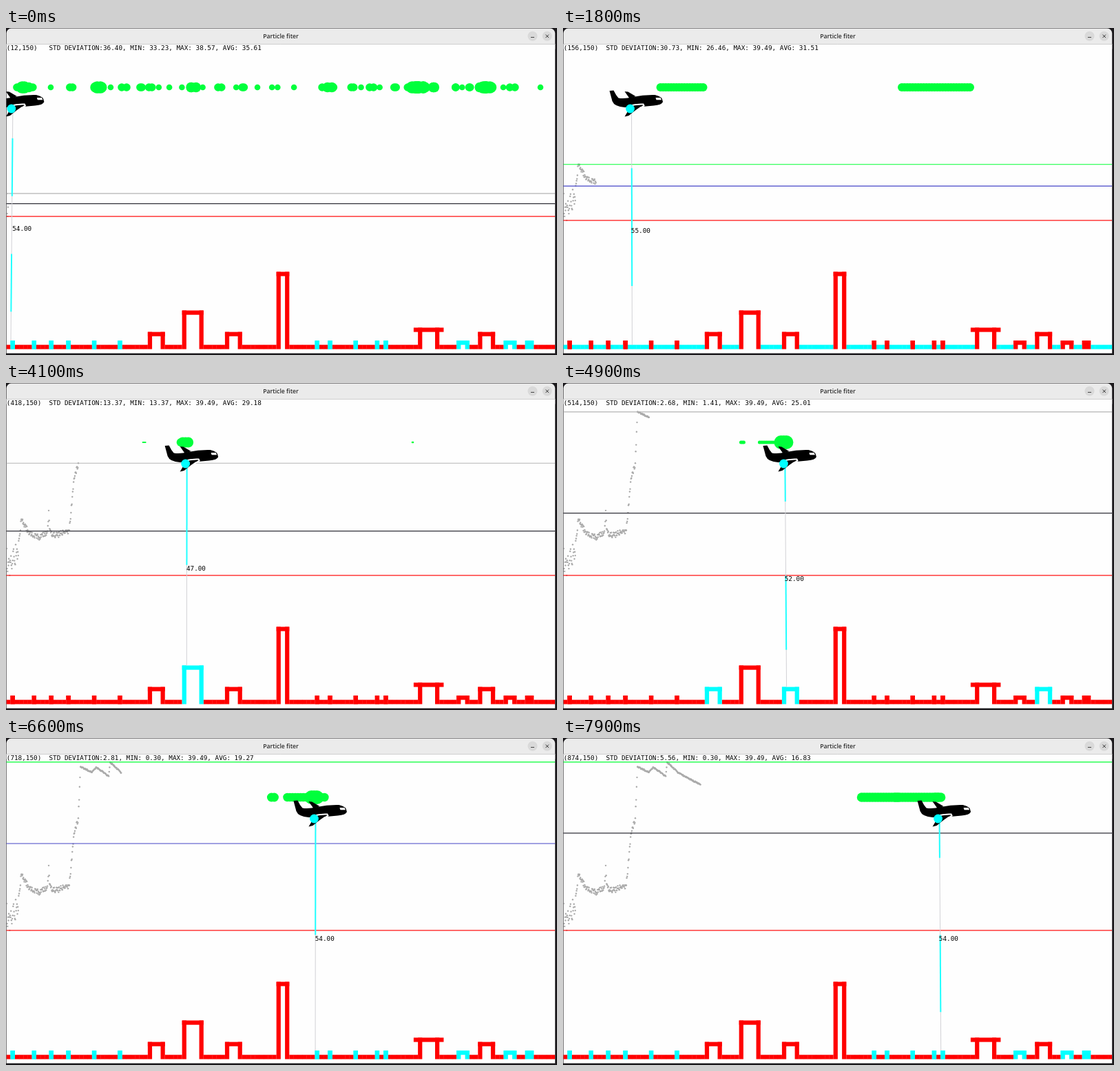
An HTML page with a canvas that plays this animation: 800 by 474 pixels, repeating every 8000 ms.

```html
<!DOCTYPE html>
<html lang="en">
<head>
<meta charset="utf-8">
<title>Particle fiter</title>
<style>
html, body { margin: 0; width: 100%; height: 100%; overflow: hidden; background: #1c1a1d; }
canvas { display: block; width: 800px; height: 474px; }
</style>
</head>
<body>
<canvas id="stage" width="800" height="474"></canvas>
<script>
const ctx = document.getElementById('stage').getContext('2d');
const S = 0.6226, CELL = 10 * S, X0 = 0.4, FLOOR = 465.5, COLS = 128;
const RIGHT = 797.2, BOTTOM = 471.5;
const RED = '#ff0000', CYAN = '#00ffff', GREEN = '#00ff3c';
const MONO = '9.32px "DejaVu Sans Mono", monospace';

// Buildings: first column, width, height in cells
const bumps = [1, 6, 10, 14, 20, 26, 72, 75, 81, 86, 88].map(c => [c, 1, 2]);
const builds = [...bumps, [33, 4, 4], [41, 5, 9], [51, 4, 4], [63, 3, 18],
  [95, 7, 5], [105, 3, 2], [110, 4, 4], [116, 3, 2], [121, 2, 2]];
const heights = Array(COLS).fill(1);
for (const [c, w, h] of builds) heights.fill(h, c, c + w);

// Key points: sample number, deviation
const curve = [[0, 33.23], [1, 37.92], [3, 36.4], [7, 39.49], [8, 36], [26, 34], [34, 26.46],
  [50, 29.3], [75, 30.73], [98, 29.39], [115, 30.15], [146, 29], [157, 17], [167, 13.37],
  [172, 1.41], [199, 2.68], [209, 1.5], [238, 3.6], [241, 0.3], [267, 2.81], [319, 5.56]];
// Key points: sample number, running average
const means = [[3, 35.61], [75, 31.51], [115, 30.81], [167, 29.18], [199, 25.01],
  [267, 19.27], [319, 16.83]];
// Swarm: step, trail from and to (from the plane), radii of trail, head and stray, far group start and radius
const swarm = [
  [18, 44, 106, 6, 0, 0, 492, 6],
  [28, -16, 38, 5.2, 8, 0, 508, 5],
  [41, -7, 1, 6, 7.5, 1, 590, 1.3],
  [49, -35, 0, 2.5, 10, 2.5, 592, 0],
  [66, -39, 15, 6.2, 10, 6.5, 592, 0],
  [79, -111, 0, 6.8, 6.8, 6.8, 592, 0]
];

const lerp = (a, b, f) => a + (b - a) * f;
const rnd = n => { const s = Math.sin(n * 127.1 + 3.7) * 43758.5453; return s - Math.floor(s); };

function span(keys, n) {
  let k = 0;
  while (k < keys.length - 2 && n >= keys[k + 1][0]) k++;
  const a = keys[k], b = keys[k + 1];
  return [a, b, Math.max(0, Math.min(1, (n - a[0]) / (b[0] - a[0])))];
}

function sample(n) {
  const [a, b, f] = span(curve, n);
  const dip = 5 * Math.exp(-Math.abs(n - 98) / 1.6);
  const noise = f % 1 === 0 ? 0 : (rnd(n) * 2 - 1) * (n < 28 ? 2.4 : n < 170 ? 0.7 : 0.15);
  const lo = Math.min(a[1], b[1]) - (n < 28 ? 2 : 0);
  return Math.min(39.4 + (f === 0), Math.max(lo, lerp(a[1], b[1], f) + noise) - dip);
}
const series = Array.from({ length: 320 }, (_, n) => sample(n));

function average(n) {
  const [a, b, f] = span(means, n);
  return lerp(a[0] * a[1], b[0] * b[1], f) / n;
}

// Crowded particles grow
const starts = Array.from({ length: 75 }, (_, k) => 12 + 775 * rnd(k + 40));
const scatter = starts.map(x =>
  [x, Math.min(9, 2.8 + 1.5 * starts.filter(o => Math.abs(o - x) < 8).length)]);

const travel = i => 12 + 8 * Math.min(i, 20) + 12 * Math.max(0, i - 20) - (i >= 35 ? 6 : 0);
const valueY = v => 33 + 10 * S * v;

function disc(x, y, r) {
  ctx.beginPath();
  ctx.arc(x, y, r, 0, 7);
  ctx.fill();
}

function line(x1, y1, x2, y2, color, w = 1) {
  ctx.strokeStyle = color;
  ctx.lineWidth = w;
  ctx.beginPath();
  ctx.moveTo(x1, y1);
  ctx.lineTo(x2, y2);
  ctx.stroke();
}

function poly(...p) {
  ctx.beginPath();
  for (let k = 0; k < p.length; k += 2) ctx.lineTo(p[k], p[k + 1]);
  ctx.closePath();
  ctx.fill();
}

function text(s, x, y) {
  ctx.fillStyle = '#000';
  ctx.font = MONO;
  ctx.textAlign = 'left';
  ctx.fillText(s, x, y);
}

function cells(c, row, w, h, color) {
  ctx.fillStyle = color;
  ctx.fillRect(X0 + c * CELL, FLOOR - (row + h) * CELL, w * CELL, h * CELL);
}

function terrain(depth) {
  const tint = h => 56 - h === depth ? CYAN : RED;
  heights.forEach((h, c) => {
    const joined = heights[c + 1] === 1 ? 1.05 : 1;
    if (h === 1 || c === 95 || c === 101) cells(c, 0, joined, 1, tint(1));
  });
  for (const [c, w, h] of builds) {
    const inset = h === 5 ? 1 : 0, color = tint(h);
    cells(c + inset, 0, 1, h, color);
    cells(c + w - 1 - inset, 0, 1, h, color);
    cells(c, h - 1, w, 1, color);
  }
}

function run(a, b, r) {
  if (r < 0.3) return;
  const steps = Math.max(1, Math.ceil((b - a) / Math.min(4, r)));
  for (let k = 0; k <= steps; k++) disc(lerp(a, b, k / steps), 86, r);
}

function particles(i, x) {
  ctx.fillStyle = GREEN;
  if (i < 6) {
    for (const [px, r] of scatter) disc(px + x - 8, 86, r);
    return;
  }
  const [p, q, f] = span(swarm, i);
  const [, from, to, trail, head, stray, far, farR] = p.map((v, k) => lerp(v, q[k], f));
  run(x + from, x + to, trail);
  run(x - 4, x + 4, head);
  run(x - 62, x - 58, stray);
  run(far, 591, farR);
}

function plane(x) {
  ctx.save();
  ctx.translate(x, 117);
  ctx.fillStyle = '#000';
  poly(-8, -25, -3, -24.5, 8, -18, -1, -15);
  ctx.beginPath();
  ctx.moveTo(-30, -26);
  ctx.lineTo(-24, -26.5);
  ctx.quadraticCurveTo(-21, -20, -17, -15.5);
  ctx.quadraticCurveTo(-8, -14, 4, -17);
  ctx.quadraticCurveTo(20, -20.5, 36, -20);
  ctx.quadraticCurveTo(47, -18, 47.5, -10);
  ctx.quadraticCurveTo(46, -5.5, 34, -4.5);
  ctx.lineTo(18, -3);
  ctx.lineTo(-8, -2);
  ctx.quadraticCurveTo(-23, -3, -26, -11);
  ctx.closePath();
  ctx.fill();
  ctx.fillStyle = '#fff';
  poly(37, -16, 44, -16, 45.5, -12.8, 38, -12.8);
  ctx.strokeStyle = '#fff';
  ctx.lineWidth = 2;
  ctx.beginPath();
  ctx.moveTo(-2, -4);
  ctx.quadraticCurveTo(8, -7, 19, -6.5);
  ctx.lineTo(20, -4.5);
  ctx.lineTo(6, 4);
  ctx.stroke();
  ctx.fillStyle = '#000';
  poly(2, -3.5, 18, -5, 8, 2, -2, 10, -8, 11.5, -3, 3);
  ctx.fillStyle = CYAN;
  disc(0, 0, 6.4);
  ctx.restore();
}

function beam(u, x, col, depth) {
  const top = 118, bottom = FLOOR - heights[col] * CELL, endX = 0.8 + col * CELL;
  const k = 2 * u % 5 || 5;
  const at = f => [lerp(x, endX, f), lerp(top, bottom, f)];
  line(x, top, endX, bottom, '#d2d2d6');
  for (let j = 0; j <= k; j++) {
    if ((j + k) % 2 === 0) continue;
    line(...at(Math.max(0, (j - 0.5) / k)), ...at(Math.min(1, (j + 0.5) / k)), '#20ffff', 2);
  }
  text(depth.toFixed(2), x - 0.7, 125.6 + 5 * S * depth);
}

function chart(i) {
  const n = 4 * i + 3, seen = series.slice(0, n + 1);
  const min = Math.min(...seen), max = Math.max(...seen), avg = average(n);
  ctx.fillStyle = '#aaaaaa';
  seen.forEach((v, k) => disc(1 + k * S, valueY(v), 1.2));
  const vivid = i >= 9 && i < 28 || i >= 58;
  const rule = (v, color) => line(0, valueY(v), RIGHT, valueY(v), color, 1.2);
  rule(min, vivid ? '#00ff32' : '#b4b4b4');
  rule(avg, vivid && i < 73 ? '#4545c8' : '#303038');
  rule(max, '#ff1010');
  text(`(${travel(i)},150)`.padEnd(11) +
    `STD DEVIATION:${series[n].toFixed(2)}, MIN: ${min.toFixed(2)}, ` +
    `MAX: ${max.toFixed(2)}, AVG: ${avg.toFixed(2)}`, 0.8, 32.3);
}

function windowBar() {
  ctx.fillStyle = '#1c1a1d';
  ctx.fillRect(0, 0, 800, 474);
  ctx.fillStyle = '#ebebeb';
  ctx.beginPath();
  ctx.roundRect(0.6, 0.6, RIGHT - 0.6, 30, [7, 7, 0, 0]);
  ctx.fill();
  ctx.fillStyle = '#fefefe';
  ctx.fillRect(0.6, 23, RIGHT - 0.6, BOTTOM - 23);
  line(0.6, 23.5, RIGHT, 23.5, '#cfcfcf');
  ctx.fillStyle = '#2e2e2e';
  ctx.font = '600 8.7px "Open Sans", "Noto Sans", sans-serif';
  ctx.textAlign = 'center';
  ctx.fillText('Particle fiter', 399, 15);
  ctx.fillStyle = '#d9d9d9';
  disc(764.5, 11.8, 7);
  disc(785.7, 11.8, 7);
  line(762, 13.5, 767, 13.5, '#444');
  line(783.5, 9.6, 788, 14.1, '#333');
  line(788, 9.6, 783.5, 14.1, '#333');
}

function draw(i) {
  const u = travel(i), x = 0.4 + u * S;
  const col = Math.floor((u + 6) / 10), depth = 56 - heights[col];
  windowBar();
  ctx.save();
  ctx.beginPath();
  ctx.rect(0.6, 24, RIGHT - 0.6, BOTTOM - 24);
  ctx.clip();
  terrain(depth);
  chart(i);
  particles(i, x);
  beam(u, x + 2, col, depth);
  plane(x);
  ctx.restore();
}

function tick(now) {
  draw(Math.floor(now % 8000 / 100));
  requestAnimationFrame(tick);
}
draw(0);
requestAnimationFrame(tick);
</script>
</body>
</html>
```
